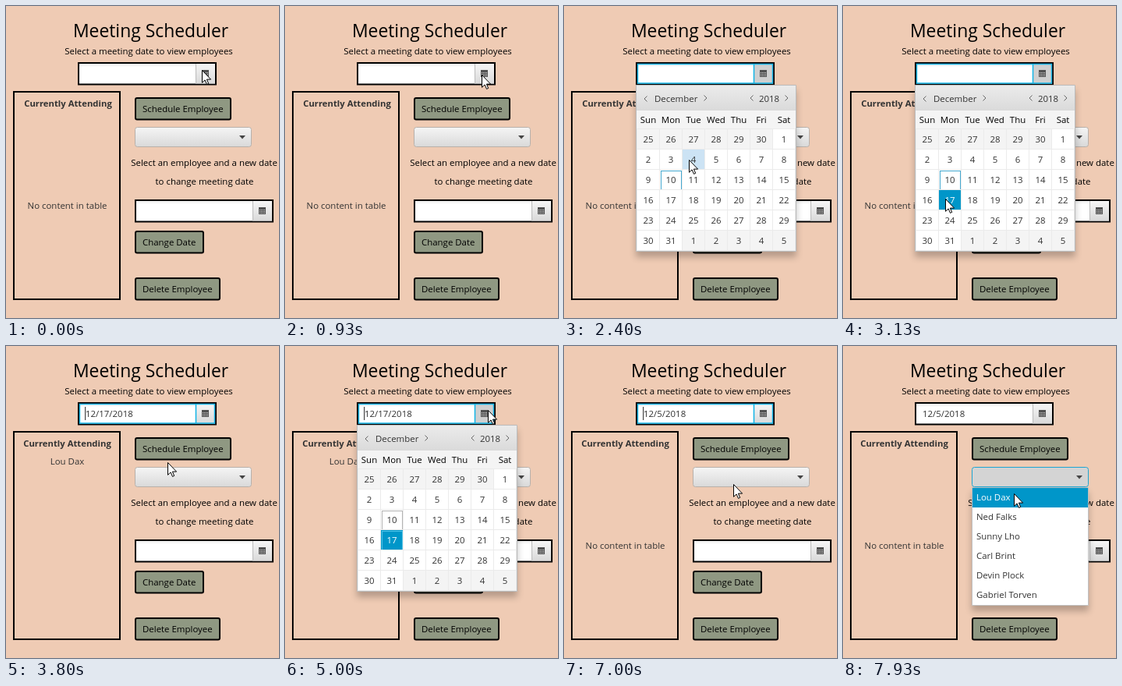
Animation, 350 px wide and 400 px high, one loop 8 s. Source, as an HTML page:

```html
<!DOCTYPE html>
<html lang="en">
<head>
<meta charset="utf-8">
<title>Meeting Scheduler</title>
<style>
html, body { margin: 0; width: 100%; height: 100%; overflow: hidden; background: #efcbb4; }
svg { display: block; }
text { font: 11.44px "Open Sans", "Noto Sans", sans-serif; fill: #333; }
.mid { text-anchor: middle; }
.ink { fill: #000; }
.popup { filter: drop-shadow(0 7px 4px rgba(0, 0, 0, .24)); }
</style>
</head>
<body>
<svg width="350" height="400" viewBox="0 0 350 400">
  <defs>
    <linearGradient id="grey" x2="0" y2="1">
      <stop stop-color="#f5f5f5"/><stop offset="1" stop-color="#d9d9d9"/>
    </linearGradient>
    <linearGradient id="head" x2="0" y2="1">
      <stop stop-color="#ebebeb"/><stop offset="1" stop-color="#dadada"/>
    </linearGradient>
    <linearGradient id="well" x2="0" y2="1">
      <stop stop-color="#e9e9e9"/><stop offset=".2" stop-color="#fff"/>
    </linearGradient>
    <g id="picker">
      <rect x="1" y="1" width="176" height="27.5" fill="url(#well)" stroke="#000" stroke-width="2"/>
      <path d="M151 2h25v25.5h-25z" fill="url(#grey)"/>
      <path d="M151.5 2v25.5" stroke="#bbb"/>
    </g>
    <g id="icon">
      <path d="M0 0h9v9h-9z" fill="#505050"/>
      <path d="M1 3.5h8M1 5.5h8M1 7.5h8" stroke="#e2e2e2" stroke-dasharray="1"/>
    </g>
  </defs>
  <text class="mid ink" x="185.5" y="40" style="font-size:22.9px">Meeting Scheduler</text>
  <text class="mid ink" x="183" y="62">Select a meeting date to view employees</text>
  <use href="#picker" x="92" y="72"/>
  <path id="armed" d="M244 75h24v24h-24z" fill="#cfcfcf"/>
  <use href="#icon" x="251" y="82"/>
  <path id="focus" d="M94.5 74.5h173v24.5h-173zM243.5 74.5v24.5" fill="none" stroke="#12b5e6" stroke-width="1.5"/>
  <text id="date" x="102" y="91"></text>
  <path id="caret" d="M101.7 78v17" stroke="#222"/>

  <rect x="10" y="110" width="136" height="266" fill="none" stroke="#000" stroke-width="2"/>
  <text id="title" class="mid" y="129" style="font-weight:bold;font-size:11.3px">Currently Attending</text>
  <text id="empty" class="mid" x="78.5" y="260">No content in table</text>
  <text id="guest" class="mid" x="78.5" y="152"></text>

  <g id="buttons"></g>
  <rect id="combo" x="165.5" y="155.5" width="149" height="25" rx="3"/>
  <path d="M299 166h8l-4 4.5z" fill="#444"/>
  <text class="mid ink" x="254" y="205">Select an employee and a new date</text>
  <text class="mid ink" x="254.5" y="229">to change meeting date</text>
  <use href="#picker" x="165" y="248"/>
  <use href="#icon" x="324" y="258"/>

  <g id="calendar" class="popup">
    <path d="M92.5 101.5h205v213h-205z" fill="#fff" stroke="#bbb"/>
    <path d="M93 102h204v32H93z" fill="url(#head)"/>
    <path d="M93 134h204v24H93z" fill="#f4f4f4"/>
    <path d="M106.5 115.5l-3.5 3.5 3.5 3.5M179.5 114.5l3.5 3.5-3.5 3.5M242.5 114.5l-3.5 3.5 3.5 3.5M283.5 114.5l3.5 3.5-3.5 3.5" fill="none" stroke="#666"/>
    <text x="116" y="123">December</text>
    <text x="250" y="123">2018</text>
  </g>
  <g id="list" class="popup">
    <path d="M165.5 181.5h149v151h-149z" fill="#fff" stroke="#c0c0c0"/>
  </g>
  <path id="cursor" d="M.5.5v15.8l3.6-3.4 2.4 5.5 2.2-1-2.3-5.3h5.2z" fill="#fff" stroke="#000"/>
</svg>
<script>
const $ = id => document.getElementById(id);
const people = ["Lou Dax", "Ned Falks", "Sunny Lho", "Carl Brint", "Devin Plock", "Gabriel Torven"];
const LOOP = 8000, STEP = 200 / 3, BLUE = "#0096c9";

function add(parent, tag, attrs, text = "") {
  const el = document.createElementNS("http://www.w3.org/2000/svg", tag);
  set(el, attrs);
  el.textContent = text;
  return parent.appendChild(el);
}
function set(el, attrs) {
  for (const key in attrs) el.setAttribute(key, attrs[key]);
}
const show = (id, on) => set($(id), { visibility: on ? "visible" : "hidden" });

for (const [y, width, label] of [
  [118, 122, "Schedule Employee"], [289, 87, "Change Date"], [349, 108, "Delete Employee"]
]) {
  add($("buttons"), "rect", { x: 166, y, width, height: 27.5, rx: 2, fill: "#8f9882", stroke: "#000", "stroke-width": 2 });
  add($("buttons"), "text", { x: 175, y: y + 18, class: "ink" }, label);
}

["Sun", "Mon", "Tue", "Wed", "Thu", "Fri", "Sat"].forEach((name, c) =>
  add($("calendar"), "text", { x: 108 + 29 * c, y: 150, class: "mid ink" }, name));

const cells = Array.from({ length: 42 }, (_, i) => {
  const x = 93.5 + 29 * (i % 7), y = 157.5 + 26 * Math.floor(i / 7);
  const day = i - 5, inMonth = day > 0 && day < 32;
  const box = add($("calendar"), "rect", { x, y, width: 29, height: 26, stroke: "#ebebeb" });
  const ring = add($("calendar"), "rect", { x: x + 2, y: y + 2, width: 26, height: 24, fill: "none" });
  const label = add($("calendar"), "text", { x: x + 14.5, y: y + 17.5, class: "mid" },
    inMonth ? day : day < 1 ? day + 30 : day - 31);
  return { day, inMonth, box, ring, label };
});

const rows = people.map((name, i) => {
  const box = add($("list"), "rect", { x: 166, y: 182 + 25 * i, width: 148, height: 25 });
  const label = add($("list"), "text", { x: 171, y: 198 + 25 * i }, name);
  return { box, label };
});

// Pointer path: time, x, y
const path = [
  [0, 251, 82], [270, 276, 108], [533, 248, 102], [930, 248, 102], [933, 252, 88],
  [1190, 252, 88], [1200, 253, 88], [1800, 253, 88], [2667, 118, 246], [2800, 124, 249],
  [2933, 131, 247], [3400, 131, 247], [3800, 207, 149], [4000, 300, 110], [4267, 259, 93],
  [4533, 260, 82], [5000, 260, 82], [5800, 197, 199], [6600, 197, 199], [7000, 217, 177],
  [7267, 300, 168], [7533, 300, 168], [7733, 306, 168], [7800, 306, 168], [7933, 219, 189], [LOOP, 219, 189]
];
function pointer(t) {
  const i = path.findIndex(p => p[0] > t);
  const [t0, x0, y0] = path[i - 1], [t1, x1, y1] = path[i];
  const k = (t - t0) / (t1 - t0);
  return [Math.round(x0 + (x1 - x0) * k), Math.round(y0 + (y1 - y0) * k)];
}

function drawCalendar(t, x, y) {
  const col = Math.floor((x - 94) / 29), row = Math.floor((y - 158) / 26);
  const hover = row >= 0 && col >= 0 && col < 7 ? row * 7 + col : -1;
  const pressed = t > 3120, reopened = t > 3190;
  const rings = { 10: reopened ? "#b4b4b4" : "#45a9d0", 17: reopened ? "#4fc3e8" : "none" };
  cells.forEach(({ day, inMonth, box, ring, label }, i) => {
    const chosen = pressed && day === 17;
    set(box, { fill: chosen ? BLUE : i === hover ? "#cce3f4" : inMonth ? "#fff" : "#f4f4f4" });
    set(ring, { stroke: rings[day] || "none" });
    label.style.fill = chosen ? "#fff" : "";
  });
}

function draw() {
  const now = performance.now() % LOOP;
  const t = Math.floor((now + 5) / STEP) * STEP % LOOP;
  const [x, y] = pointer(t);
  const within = (a, b) => t > a - 10 && t < b - 10;
  const editing = within(1733, 7467), listing = t > 7457;
  const choosing = within(1733, 3200) || within(5000, 6133);
  const attending = within(3200, 6133);

  set($("cursor"), { transform: `translate(${x} ${y})` });
  show("focus", editing);
  show("caret", editing && Math.floor((t - 1640) / 493) % 2 === 0);
  $("date").textContent = t < 3190 ? "" : attending ? "12/17/2018" : "12/5/2018";
  set($("title"), { x: t < 3190 ? 79.5 : 78.5 });
  $("guest").textContent = attending ? people[0] : "";
  show("empty", !attending);
  set($("combo"), {
    stroke: within(1533, 1733) || listing ? "#1ea5d2" : "#b8b0aa",
    fill: listing ? "#d4d4d4" : "url(#grey)"
  });

  show("armed", choosing);
  show("calendar", choosing);
  drawCalendar(t, x, y);

  show("list", listing);
  rows.forEach(({ box, label }, i) => {
    const hot = Math.floor((y - 182) / 25) === i;
    set(box, { fill: hot ? BLUE : "#fff" });
    label.style.fill = hot ? "#fff" : "";
  });
  requestAnimationFrame(draw);
}
draw();
</script>
</body>
</html>
```
